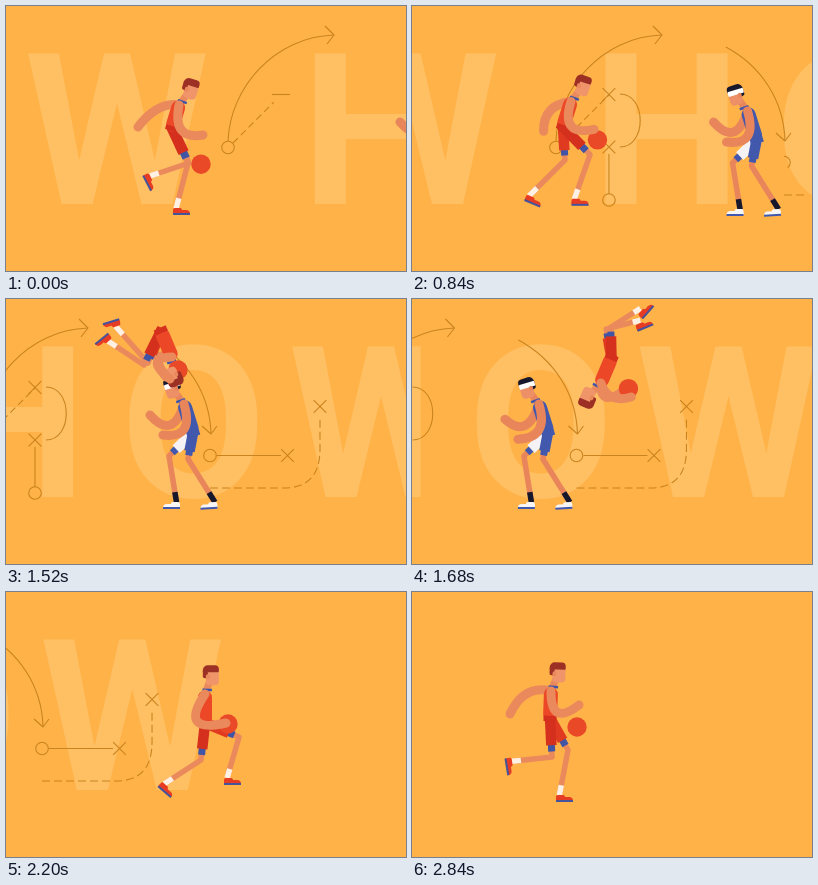
An HTML page with a canvas that plays this animation: 400x265 px, repeating every 2880 ms.

```html
<!DOCTYPE html>
<html lang="en">
<head>
<meta charset="utf-8">
<title>Basketball run</title>
<style>
html, body { margin: 0; width: 100%; height: 100%; overflow: hidden; background: #ffb248; }
canvas { display: block; }
</style>
</head>
<body>
<canvas id="stage" width="400" height="265"></canvas>
<script>
const ctx = document.getElementById('stage').getContext('2d');
const LOOP = 2880;
const RAD = Math.PI / 180;
const INK = '#c9841f';
const mix = (a, b, u) => a + (b - a) * u;
const ramp = (t, from, to) => Math.min(1, Math.max(0, (t - from) / (to - from)));

// Each joint hangs from a parent; poses list joints in this order.
const JOINTS = ['hip', 'shoulder', 'elbowN', 'handN', 'elbowF', 'handF', 'kneeA', 'ankleA', 'kneeB', 'ankleB'];
const PARENT = { shoulder: 'hip', elbowN: 'shoulder', handN: 'elbowN', elbowF: 'shoulder', handF: 'elbowF',
  kneeA: 'hip', ankleA: 'kneeA', kneeB: 'hip', ankleB: 'kneeB' };

function pose(...xy) {
  const p = {};
  JOINTS.forEach((name, i) => p[name] = [xy[2 * i], xy[2 * i + 1]]);
  return p;
}
const swapLegs = p => ({ ...p, kneeA: p.kneeB, kneeB: p.kneeA, ankleA: p.ankleB, ankleB: p.ankleA });
const shift = (p, dx) => Object.fromEntries(JOINTS.map(n => [n, [p[n][0] + dx, p[n][1]]]));

const stance = pose(166,122, 173,99, 172,128, 197,129, 152,100, 132,121, 182,157, 171,199, 183,157, 147,169);
const toeOff = pose(156,120, 165,92, 158,120, 187,117, 141,106, 148,122, 147,146, 129,199, 191,137, 173,177);
const ready = pose(145,135, 147,108, 148,130, 186,123, 116,114, 135,125, 168,162, 137,200, 170,164, 149,200);
const vault = pose(148,80, 172,88, 190,92, 203,84, 193,94, 206,86, 140,112, 110,125, 150,110, 120,132);
const over = pose(155,32, 166,58, 146,62, 164,80, 148,56, 160,78, 138,66, 105,44, 142,64, 112,30);
const tumble = pose(205,62, 192,86, 205,100, 225,95, 200,104, 220,85, 214,34, 244,24, 209,34, 240,34);
const landing = pose(222,145, 219,114, 256,112, 249,86, 245,108, 231,82, 240,173, 211,202, 258,160, 244,200);
const stride = pose(199,131, 199,102, 184,134, 220,131, 194,128, 215,134, 195,168, 161,190, 233,145, 222,183);
const sprint = pose(138,126, 139,99, 143,126, 167,113, 114,98, 98,122, 156,158, 148,200, 140,165, 103,169);
const guard = pose(-2,134, 7,105, 3,134, 28,136, 20,132, 41,116, 3,160, -22,200, 22,157, 15,200);

const playerKeys = [
  [0, stance], [112, shift(toeOff, 8)], [224, swapLegs(shift(stance, -4))],
  [336, swapLegs(shift(toeOff, 4))], [448, shift(stance, -8)], [560, toeOff],
  [672, swapLegs(shift(stance, -12))], [784, swapLegs(shift(toeOff, -4))], [896, shift(stance, -16)],
  [1080, ready], [1160, ready], [1340, vault], [1520, over], [1700, tumble], [1880, landing],
  [2200, stride], [2328, swapLegs(shift(sprint, 48))], [2456, swapLegs(shift(stride, -25))],
  [2584, shift(sprint, 24)], [2712, shift(stride, -49)], [2840, swapLegs(sprint)], [2880, swapLegs(sprint)]
];
const guardShift = [[0, 165], [560, 136], [1160, 0], [1520, -85], [1880, -200], [2200, -305], [2880, -500]];
const ballKeys = [[0, 195, 162], [560, 188, 194], [770, 186, 136], [1160, 183, 124], [1340, 195, 90],
  [1520, 172, 71], [1700, 222, 92], [1880, 242, 94], [2200, 222, 132], [2392, 206, 135], [2840, 165, 135], [2880, 162, 135]];

function span(keys, t) {
  let i = 0;
  while (i < keys.length - 2 && t >= keys[i + 1][0]) i++;
  return [keys[i], keys[i + 1], ramp(t, keys[i][0], keys[i + 1][0])];
}
function track(keys, t) {
  const [a, b, u] = span(keys, t);
  return a.slice(1).map((v, i) => mix(v, b[i + 1], u));
}

// Bones turn the short way round, so limbs keep their length.
function blend(a, b, u) {
  const out = { hip: a.hip.map((v, i) => mix(v, b.hip[i], u)) };
  for (const name of JOINTS.slice(1)) {
    const up = PARENT[name];
    const bone = p => [p[name][0] - p[up][0], p[name][1] - p[up][1]];
    const [ax, ay] = bone(a), [bx, by] = bone(b);
    const from = Math.atan2(ay, ax);
    const turn = Math.atan2(ax * by - ay * bx, ax * bx + ay * by);
    const len = mix(Math.hypot(ax, ay), Math.hypot(bx, by), u);
    const angle = from + turn * u;
    out[name] = [out[up][0] + len * Math.cos(angle), out[up][1] + len * Math.sin(angle)];
  }
  return out;
}

function limb(color, width, cap, ...pts) {
  ctx.strokeStyle = color;
  ctx.lineWidth = width;
  ctx.lineCap = cap;
  ctx.lineJoin = 'round';
  ctx.beginPath();
  pts.forEach(p => ctx.lineTo(...p));
  ctx.stroke();
}
function box(color, x, y, w, h, r = 0) {
  ctx.fillStyle = color;
  ctx.beginPath();
  ctx.roundRect(x, y, w, h, r);
  ctx.fill();
}
function at([x, y], angle, draw) {
  ctx.save();
  ctx.translate(x, y);
  ctx.rotate(angle);
  draw();
  ctx.restore();
}
const between = (a, b, u) => [mix(a[0], b[0], u), mix(a[1], b[1], u)];

function arm(color, shoulder, elbow, hand) {
  ctx.strokeStyle = color;
  ctx.lineWidth = 9;
  ctx.lineCap = 'round';
  ctx.beginPath();
  ctx.moveTo(...shoulder);
  const pull = between(between(shoulder, hand, 0.5), elbow, 1.45);
  ctx.quadraticCurveTo(...pull, ...hand);
  ctx.stroke();
}

function leg(look, shorts, hip, knee, ankle) {
  limb(look.skin, 5.5, 'round', between(hip, knee, 0.7), knee, ankle);
  limb(look.cuff, 7, 'butt', between(hip, knee, 0.6), between(hip, knee, 0.86));
  limb(shorts, 10.5, 'butt', between(hip, knee, -0.08), between(hip, knee, 0.7));
  limb(look.sock, 5.5, 'butt', between(knee, ankle, 0.84), between(knee, ankle, 1.08));
  const shin = Math.atan2(ankle[1] - knee[1], ankle[0] - knee[0]) / RAD;
  const bend = (shin + 360) % 360 - 90;
  at(ankle, Math.max(0, (bend - 30) * 1.5) * RAD, () => {
    box(look.shoe, -4, 3, 9, 6, 2);
    box(look.shoe, -4, 5, 17, 4, [2, 4, 0, 0]);
    box(look.sole, -4, 8, 17, 2);
  });
}

function head(look, center, angle) {
  at(center, angle, () => {
    box(look.face, -6, -8, 13, 18, 4);
    box(look.hair, -9, -10, 16, 7, [5, 4, 1, 1]);
    box(look.hair, -9, -6, 5, 9, 2);
    if (look.band) box(look.band, -9, -5, 16, 5, 1);
    box(look.skin, -6, -1, 4, 5, 2);
  });
}

function person(p, look, drawBall) {
  const angle = Math.atan2(p.shoulder[1] - p.hip[1], p.shoulder[0] - p.hip[0]);
  const reach = (turn, len) => [p.shoulder[0] + len * Math.cos(angle + turn), p.shoulder[1] + len * Math.sin(angle + turn)];
  const skull = reach(20 * RAD, 20);
  arm(look.skin, p.shoulder, p.elbowF, p.handF);
  leg(look, look.shortsFar, p.hip, p.kneeB, p.ankleB);
  leg(look, look.shorts, p.hip, p.kneeA, p.ankleA);
  limb(look.skin, 7, 'butt', p.shoulder, skull);
  limb(look.jersey, 14, 'round', between(p.hip, p.shoulder, 0.15), between(p.hip, p.shoulder, 0.88));
  limb(look.cuff, 2.5, 'butt', reach(-30 * RAD, 5), reach(60 * RAD, 8));
  limb(look.shorts, 13, 'butt', between(p.hip, p.shoulder, -0.12), between(p.hip, p.shoulder, 0.08));
  if (drawBall) drawBall();
  head(look, skull, angle + 90 * RAD);
  arm(look.skin, p.shoulder, p.elbowN, p.handN);
}

const redTeam = { skin: '#ea8a5c', face: '#f0956a', hair: '#9d3024', jersey: '#ec4828', shorts: '#d5301d',
  shortsFar: '#e03a20', cuff: '#4055a6', sock: '#fff0e4', shoe: '#e63c23', sole: '#45529c' };
const blueTeam = { skin: '#e9855a', face: '#ee9067', hair: '#17182c', band: '#ffffff', jersey: '#4158ac', shorts: '#4158ac',
  shortsFar: '#f4f2f4', cuff: '#4158ac', sock: '#17182c', shoe: '#f8f5f5', sole: '#4158ac' };

function drawBall(t) {
  let [x, y] = track(ballKeys, t);
  const bounce = degrees => 200 - 65 * Math.abs(Math.sin(degrees * RAD));
  if (t < 770) y = bounce((t - 560) / 448 * 180 + 5);
  if (t > 2392) y = bounce((t - 2392) / 448 * 180 + 90);
  ctx.fillStyle = '#e94927';
  ctx.beginPath();
  ctx.arc(x, y, 9.7, 0, 7);
  ctx.fill();
}

// Draws the first part of a path; dashes are cut at the same length.
function trace(d, length, part, on = 0, off = 0) {
  if (part <= 0) return;
  const shown = length * part;
  const dash = [];
  if (on) {
    for (let s = 0; s < shown; s += on + off) dash.push(Math.min(on, shown - s), off);
    dash[dash.length - 1] = 9999;
  } else if (part < 1) dash.push(shown, 9999);
  ctx.setLineDash(dash);
  ctx.stroke(new Path2D(d));
  ctx.setLineDash([]);
}
function ring(x, y, part) {
  ctx.beginPath();
  ctx.arc(x, y, 6.3, -Math.PI / 2, (part * 360 - 90) * RAD);
  if (part > 0) ctx.stroke();
}
function cross(x, y, part) {
  if (part < 0) return;
  for (const side of [-1, 1]) at([x, y], side * 45 * part * RAD, () => {
    ctx.beginPath();
    ctx.moveTo(-9, 0);
    ctx.lineTo(9, 0);
    ctx.stroke();
  });
}
const crossFrom = (x, y, t, start) => cross(x, y, t < start ? -1 : ramp(t, start, start + 120));

function playbook(t) {
  ctx.strokeStyle = INK;
  ctx.lineWidth = 1.1;
  ctx.lineCap = 'butt';
  ring(222, 141.5, 1);
  trace('M222 135C224 82 268 31 328 29', 155, 1);
  trace('M319 20L328 29L321 38', 30, 1);
  trace('M227 137L275 89', 68, ramp(t, -280, 50), 7, 4);
  crossFrom(275, 88.5, t, 0);
  trace('M286 88C313 88 313 141 286 141', 80, ramp(t, 120, 320));
  crossFrom(275, 141, t, 300);
  trace('M275 148V188', 40, ramp(t, 400, 560));
  ring(275, 194, ramp(t, 580, 700));
  trace('M392 41C427 60 450 94 451 135', 115, ramp(t, 480, 800));
  trace('M442 127L451 135L457 127', 30, ramp(t, 780, 840));
  ring(450, 156.5, ramp(t, 800, 900));
  trace('M457 156.5H521', 64, ramp(t, 880, 1040));
  crossFrom(527.5, 156.5, t, 1020);
  trace('M450 189H524Q560 189 560 150V118', 165, ramp(t, 800, 1080), 8, 4);
  crossFrom(560, 107.5, t, 1030);
}

function letters(offset) {
  ctx.font = 'bold 211px Roboto, Arial, sans-serif';
  ctx.fillStyle = '#ffbf63';
  [['W', 111], ['H', 370], ['O', 551], ['W', 739]].forEach(([char, middle]) => {
    const m = ctx.measureText(char);
    const ink = (m.actualBoundingBoxRight - m.actualBoundingBoxLeft) / 2;
    ctx.fillText(char, middle - offset - ink, 198);
  });
}

function draw(t) {
  ctx.fillStyle = '#ffb248';
  ctx.fillRect(0, 0, 400, 265);
  const camera = Math.max(0, t - 524) * 0.247;
  letters(camera * 1.48);
  at([-camera, 0], 0, () => playbook(t));

  ctx.save();
  ctx.translate(270 + track(guardShift, t)[0], 0);
  ctx.scale(-1, 1);
  const drop = 9 * ramp(t, 1540, 1840);
  const lower = ([x, y]) => [x, y + drop];
  person({ ...guard, handN: lower(guard.handN), handF: lower(guard.handF) }, blueTeam);
  ctx.restore();

  const [a, b, u] = span(playerKeys, t);
  person(blend(a[1], b[1], u), redTeam, () => drawBall(t));
}

function frame() {
  const t = performance.now() % LOOP;
  draw(Math.floor(t / 40) * 40);
  requestAnimationFrame(frame);
}
frame();
</script>
</body>
</html>
```
